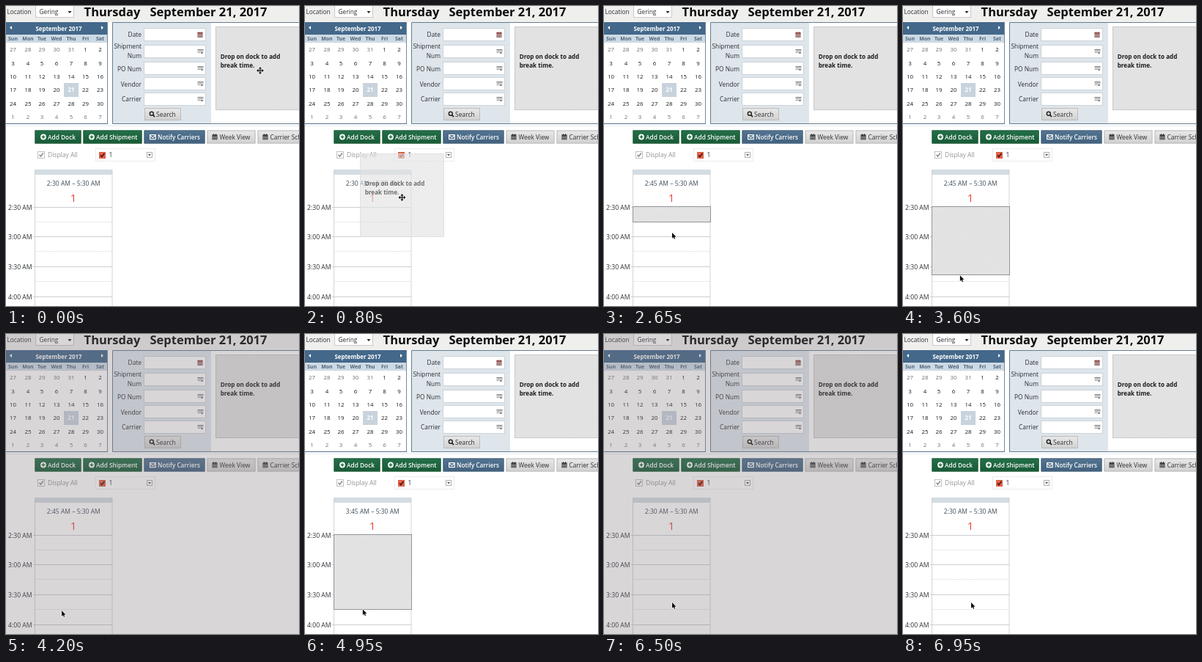
Recreate the animation shown at these times as an HTML page with a canvas. Size 400x409 px, loop 7000 ms.

```html
<!DOCTYPE html>
<html lang="en">
<head>
<meta charset="utf-8">
<title>Dock schedule</title>
<style>
html, body { margin: 0; width: 100%; height: 100%; overflow: hidden; background: #fff; }
canvas { display: block; width: 400px; height: 409px; }
</style>
</head>
<body>
<canvas id="stage"></canvas>
<script>
const W = 400, H = 409, LOOP = 7000;
const canvas = document.getElementById('stage');
const dpr = window.devicePixelRatio || 1;
canvas.width = W * dpr;
canvas.height = H * dpr;
const c = canvas.getContext('2d');
c.scale(dpr, dpr);

const FACE = '"Open Sans", "Noto Sans", sans-serif';
const INK = '#2b2f33';

function text(s, x, y, size = 8.5, color = INK, weight = 400, align = 'left') {
  c.font = `${weight} ${size}px ${FACE}`;
  c.fillStyle = color;
  c.textAlign = align;
  c.fillText(s, x, y);
}
function rect(x, y, w, h, color) {
  c.fillStyle = color;
  c.fillRect(x, y, w, h);
}
function frame(x, y, w, h, color, lw = 1) {
  c.strokeStyle = color;
  c.lineWidth = lw;
  c.strokeRect(x + .5, y + .5, w - 1, h - 1);
}
function line(points, color, lw = 1) {
  c.strokeStyle = color;
  c.lineWidth = lw;
  c.beginPath();
  points.forEach(([x, y]) => c.lineTo(x, y));
  c.stroke();
}
function poly(points, color) {
  c.fillStyle = color;
  c.beginPath();
  points.forEach(([x, y]) => c.lineTo(x, y));
  c.closePath();
  c.fill();
}
function disc(x, y, r, color) {
  c.fillStyle = color;
  c.beginPath();
  c.arc(x, y, r, 0, 7);
  c.fill();
}
function hatch(x, y, w, h, border) {
  rect(x, y, w, h, '#e4e4e4');
  c.save();
  c.beginPath();
  c.rect(x, y, w, h);
  c.clip();
  c.strokeStyle = '#dcdcdc';
  c.lineWidth = .8;
  c.beginPath();
  for (let i = -h; i < w; i += 4) {
    c.moveTo(x + i, y);
    c.lineTo(x + i + h, y + h);
  }
  c.stroke();
  c.restore();
  frame(x, y, w, h, border);
}
function button(x, y, w, h, top, bottom, edge) {
  const g = c.createLinearGradient(0, y, 0, y + h);
  g.addColorStop(0, top);
  g.addColorStop(1, bottom);
  rect(x, y, w, h, g);
  frame(x, y, w, h, edge);
}
const grayButton = (x, y, w, h) => button(x, y, w, h, '#e9e9e9', '#d0d0d0', '#bcbcbc');

function tick(x, y, color) {
  line([[x - 2.5, y], [x - .6, y + 2], [x + 2.8, y - 2.4]], color, 1.6);
}
function calIcon(x, y, color) {
  rect(x, y, 7, 7, color);
  rect(x + 1.5, y - 1, 1, 2, color);
  rect(x + 4.5, y - 1, 1, 2, color);
  for (let i = 0; i < 9; i++) rect(x + .8 + i % 3 * 2, y + 2.2 + (i / 3 | 0) * 1.6, 1.3, .9, '#dedede');
}
function listIcon(x, y) {
  rect(x, y, 8, 1.2, '#777');
  rect(x, y + 2, 8, 1, '#999');
  rect(x, y + 4, 4, 1, '#999');
  poly([[x + 4, y + 4], [x + 8, y + 4], [x + 6, y + 6.5]], '#666');
}
function plusIcon(x, y, hole) {
  disc(x, y, 3.9, '#fff');
  rect(x - 2.3, y - .7, 4.6, 1.4, hole);
  rect(x - .7, y - 2.3, 1.4, 4.6, hole);
}

function topBar() {
  rect(0, 0, W, 22, '#efefee');
  text('Location', 1.5, 11, 8.3);
  rect(40, -2, 53, 18, '#fff');
  frame(40, -2, 53, 18, '#c9c9c9');
  text('Gering', 45.5, 11, 8.3);
  poly([[84.5, 7], [89.5, 7], [87, 10]], '#222');
  text('Thursday', 106.6, 14, 16.5, '#0b0b0b', 700);
  text('September 21, 2017', 196.5, 14, 16.5, '#0b0b0b', 700);
}

function calendar() {
  const cols = [9.5, 30, 49, 69, 89, 108.5, 128.5];
  const rows = [62, 80.5, 99, 117.3, 135.7, 154];
  rect(0, 22, 139, 138, '#fff');
  rect(0, 22, 139, 17, '#43688a');
  text('September 2017', 72, 34, 7.9, '#fff', 700, 'center');
  poly([[5, 29.5], [8, 27], [8, 32]], '#fff');
  poly([[133, 29.5], [130, 27], [130, 32]], '#fff');
  rect(0, 39, 139, 11, '#cddae4');
  ['Sun', 'Mon', 'Tue', 'Wed', 'Thu', 'Fri', 'Sat'].forEach((d, i) =>
    text(d, cols[i], 47, 6.9, '#4a6279', 700, 'center'));
  rect(79, 105, 20, 19, '#c8d3dd');
  for (let i = 0; i < 42; i++) {
    const n = i - 4;
    const day = n < 1 ? n + 31 : n > 30 ? n - 30 : n;
    const out = n < 1 || n > 30;
    const picked = n === 21;
    text(day, cols[i % 7], rows[i / 7 | 0], 7.9,
      picked ? '#fff' : out ? '#6c7073' : '#16191b', picked ? 700 : 400, 'center');
  }
  line([[138.5, 22], [138.5, 160]], '#7289a0');
  line([[0, 160.5], [139, 160.5]], '#55708a');
}

function searchPanel() {
  rect(145, 22, 255, 139, '#fff');
  rect(145, 22, 135, 139, '#dee6ec');
  line([[400, 22.5], [145.5, 22.5], [145.5, 160.5], [400, 160.5]], '#667d91');
  const labels = [['Date', 42], ['Shipment', 58], ['Num', 71], ['PO Num', 89], ['Vendor', 109.5], ['Carrier', 129.5]];
  labels.forEach(([s, y]) => text(s, 185, y, 8.4, INK, 400, 'right'));
  [30, 53, 76, 97, 118].forEach((y, i) => {
    rect(188, y, 85, 18, '#fff');
    frame(188, y, 85, 18, '#ccd3d9');
    if (i) {
      listIcon(261.5, y + 6);
    } else {
      calIcon(261.5, y + 6, '#855a5a');
      rect(261.5, y + 6, 7, 1.6, '#a44a48');
    }
  });
  grayButton(189, 139, 50, 17);
  c.strokeStyle = '#222';
  c.lineWidth = 1.4;
  c.beginPath();
  c.arc(198.8, 146.8, 2.5, 0, 7);
  c.stroke();
  line([[200.7, 148.7], [203, 151.2]], '#222', 1.7);
  text('Search', 205, 150.5, 8.5);
}

function breakBox(x, y, border = '#c8c8c8') {
  hatch(x, y, 115, 114, border);
  text('Drop on dock to add', x + 6.7, y + 43.5, 8.15, '#1b1b1b', 700);
  text('break time.', x + 6.7, y + 55.5, 8.15, '#1b1b1b', 700);
}

function toolbar() {
  line([[0, 163.5], [W, 163.5]], '#e3e9ee');
  const top = 169.5, h = 18;
  const green = (x, w) => button(x, top, w, h, '#24704a', '#185a35', '#1d5c39');
  green(39.5, 63);
  plusIcon(51, 178.5, '#1e6540');
  text('Add Dock', 57, 181.7, 8.3, '#fff', 600);
  green(105.5, 80);
  plusIcon(117, 178.5, '#1e6540');
  text('Add Shipment', 123, 181.7, 8.3, '#fff', 600);
  button(188.5, top, 83, h, '#547592', '#41617d', '#46647e');
  c.strokeStyle = '#fff';
  c.lineWidth = 1.2;
  c.strokeRect(196.6, 175.6, 7.6, 6);
  line([[196.6, 176.5], [200.4, 179.6], [204.2, 176.5]], '#fff', 1.1);
  text('Notify Carriers', 207, 181.7, 8.2, '#fff', 600);
  grayButton(274.5, top, 66, h);
  calIcon(281.5, 175.3, '#333');
  text('Week View', 291.5, 181.7, 8.4);
  grayButton(343.5, top, 80, h);
  calIcon(350.5, 175.3, '#333');
  text('Carrier Schedule', 360.5, 181.7, 8.4);
}

function filters() {
  frame(43, 198, 10, 10, '#c2c2c2');
  tick(48, 203, '#8c8c8c');
  text('Display All', 57, 206, 8.5, '#929292');
  frame(122, 194, 82, 18, '#ececec');
  rect(127, 199, 9, 9, '#ee5f43');
  frame(127, 199, 9, 9, '#d0604c');
  tick(131.5, 203.5, '#3a1712');
  text('1', 140.5, 206, 8.5);
  frame(192, 199, 8, 8, '#b0b0b0');
  poly([[194, 202], [198, 202], [196, 204.6]], '#555');
}

function schedule(start) {
  rect(39, 223, 106, 7, '#d3dce3');
  line([[39.5, 223], [39.5, H]], '#cfd3d6');
  line([[145, 223], [145, H]], '#cfd3d6');
  text(`${start} AM – 5:30 AM`, 92.3, 244.5, 8.5, '#3d4b57', 400, 'center');
  text('1', 92, 267.3, 15, '#ea4335', 400, 'center');
  ['2:30', '3:00', '3:30', '4:00'].forEach((t, i) => {
    const y = Math.round(273.5 + i * 40.7) + .5;
    text(t + ' AM', 35.5, y + 3, 8.6, INK, 400, 'right');
    line([[37, y], [145, y]], '#cbced0');
    c.setLineDash([1, 1]);
    line([[39, y + 20], [145, y + 20]], '#d6d6d6');
    c.setLineDash([]);
  });
}

function breakBlock(bottom, hover) {
  hatch(39, 273, 107, bottom - 273, '#8f959a');
  if (!hover) return;
  rect(40, 358, 105, bottom - 359, '#a2a2a2');
  button(67, 358, 47, 17, '#d0d0d0', '#c2c2c2', '#bababa');
  line([[73.5, 364.5], [78.5, 369.8]], '#111', 1.9);
  line([[78.5, 364.5], [73.5, 369.8]], '#111', 1.9);
  text('Delete', 82, 370.3, 8.6);
}

function arrow(x, y) {
  const p = [[0, 0], [0, 9.2], [2.1, 7.3], [3.5, 10.4], [5, 9.8], [3.6, 6.8], [6.5, 6.7]]
    .map(([a, b]) => [x + a * .85, y + b * .85]);
  line([...p, p[0]], '#fff', 1.2);
  poly(p, '#0a0a0a');
}
function moveCursor(x, y) {
  for (const [col, lw, k] of [['#fff', 3, 1], ['#111', 1.2, 0]]) {
    line([[x - 4, y], [x + 4, y]], col, lw);
    line([[x, y - 4], [x, y + 4]], col, lw);
    for (let i = 0; i < 4; i++) {
      c.save();
      c.translate(x, y);
      c.rotate(i * Math.PI / 2);
      poly([[0, -5 - k], [-2.2 - k, -2.4 + k * .4], [2.2 + k, -2.4 + k * .4]], col);
      c.restore();
    }
  }
}

const clamp = v => Math.max(0, Math.min(1, v));
const ease = v => v * v * (3 - 2 * v);

// Pointer stops: time, x, y
const PATH = [
  [0, 347, 88], [150, 343, 88], [800, 132.5, 261], [1250, 93, 306], [2400, 93, 306],
  [2600, 93, 309], [2800, 93, 309], [3050, 92, 294], [3750, 76, 377], [4800, 76, 377],
  [5400, 94, 367], [6300, 94, 367], [6500, 93, 366], [LOOP, 93, 366]
];
function pointer(t) {
  const i = Math.max(1, PATH.findIndex(p => p[0] > t));
  const [t0, x0, y0] = PATH[i - 1], [t1, x1, y1] = PATH[i];
  const k = ease((t - t0) / (t1 - t0));
  return [x0 + (x1 - x0) * k, y0 + (y1 - y0) * k];
}

// Loading spans: start, end
const BUSY = [[1400, 2350], [3850, 4650], [6300, 6700]];
function veil(t) {
  return Math.max(...BUSY.map(([a, b]) => Math.min(clamp((t - a) / 100), clamp((b - t) / 100))));
}

function draw(t) {
  const [px, py] = pointer(t);
  const start = t < 1500 || t >= 6500 ? '2:30' : t < 4500 ? '2:45' : '3:45';
  rect(0, 0, W, H, '#fff');
  topBar();
  calendar();
  searchPanel();
  breakBox(286, 28);
  toolbar();
  filters();
  schedule(start);

  if (t >= 2300 && t < 3900) {
    breakBlock(t < 3050 ? 295 : Math.max(295, Math.min(376, Math.round(py))), false);
  } else if (t >= 4600 && t < 6400) {
    breakBlock(376, py < 375);
  }

  const dragging = t >= 150 && t < 1300;
  if (dragging) {
    c.globalAlpha = .6;
    breakBox(px - 57.5, py - 60, '#dadada');
    c.globalAlpha = 1;
  }
  const shade = veil(t);
  if (shade > 0) rect(0, 0, W, H, `rgba(125,116,122,${.29 * shade})`);

  if (t < 1300) moveCursor(px, py);
  else arrow(px, py);
}

function tickFrame(now) {
  draw(now % LOOP);
  requestAnimationFrame(tickFrame);
}
draw(0);
requestAnimationFrame(tickFrame);
</script>
</body>
</html>
```
